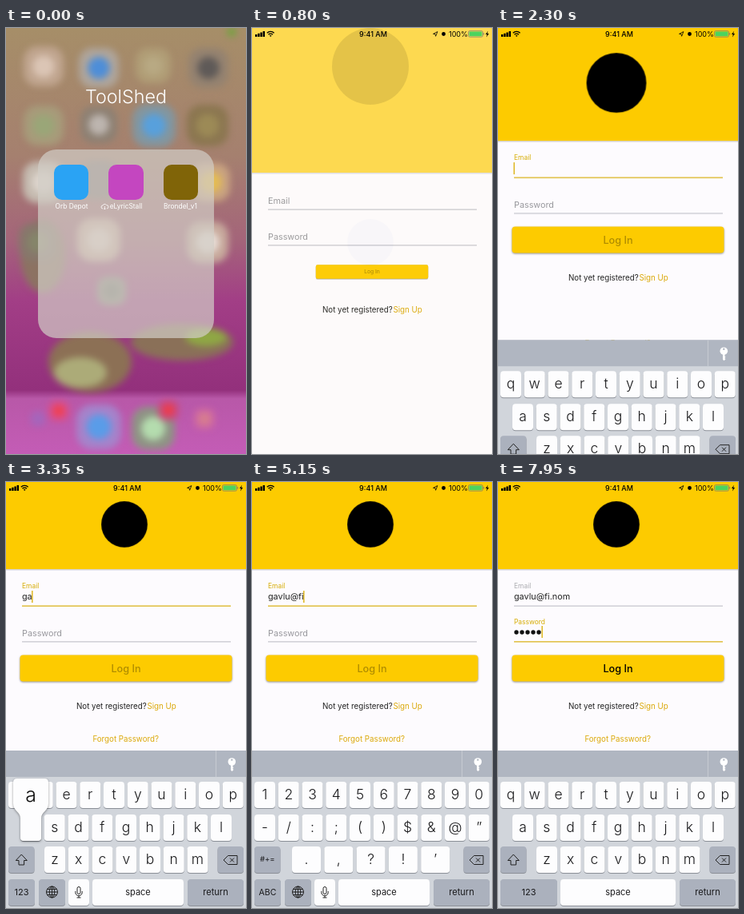
An HTML page that plays this animation: 300x533 px, repeating every 8000 ms.

```html
<!DOCTYPE html>
<html lang="en">
<head>
<meta charset="utf-8">
<title>App launch and log in</title>
<style>
html, body { margin: 0; width: 100%; height: 100%; overflow: hidden; background: #fdfbfe; }
svg { display: block; width: 100vw; height: 100vh; font-family: Inter, "Open Sans", sans-serif; }
.mid { text-anchor: middle; }
.soft { filter: blur(4.2px); }
.move { animation: 8s cubic-bezier(.25, .46, .45, .94) infinite; }

#dim { animation-name: dim; }
#blobs { animation-name: leave; }
#folder { animation-name: zoom; transform-origin: 218px 193px; }
#app { animation-name: open; }
#spinner { animation-name: spin; }
#login { animation-name: login; }
#header { animation-name: header; }
.shift { animation-name: shift; }
#logo { animation-name: logo; transform-origin: 148px 88px; }
#drop { animation-name: drop; }
#button { animation-name: grow; transform-origin: 150px 305px; }
#forgot { animation-name: forgot; }
#keyboard { animation-name: rise; animation-timing-function: cubic-bezier(.215, .61, .355, 1); }
#emailLabel { animation-name: emailLabel; transform-origin: 20px 220px; }
#passLabel { animation-name: passLabel; transform-origin: 20px 265px; }
#emailLine { animation-name: emailLine; }
#passLine { animation-name: passLine; }

@keyframes dim { 0%, .625% { opacity: 0 } 4%, 100% { opacity: .66 } }
@keyframes leave { 0%, .625% { opacity: 1 } 3.8%, 100% { opacity: 0 } }
@keyframes zoom { 0%, .625% { transform: none; opacity: 1 } 3.8%, 100% { transform: scale(2.8); opacity: 0 } }
@keyframes open {
  0%, .625% { transform: translate(197px, 172px) scale(.143, .081); opacity: 0 }
  1.25% { opacity: 1 }
  5.25%, 100% { transform: none; opacity: 1 }
}
@keyframes spin { 0%, 8% { opacity: 1 } 8.5%, 100% { opacity: 0 } }
@keyframes login { 0%, 7.5% { opacity: 0 } 10.625%, 100% { opacity: 1 } }
@keyframes header { 0%, 8.75% { opacity: .6 } 15% { opacity: .88 } 20%, 100% { opacity: 1 } }
@keyframes shift { 0%, 27.5% { transform: none } 31.5%, 100% { transform: translateY(-72px) } }
@keyframes logo { 0%, 27.5% { transform: none } 31.5%, 100% { transform: translateY(-35px) scale(.602) } }
@keyframes drop { 0%, 11.25% { transform: translateY(-40px); opacity: .1 } 20%, 100% { transform: none; opacity: 1 } }
@keyframes grow { 0%, 11.25% { transform: scale(.53) } 20%, 100% { transform: none } }
@keyframes forgot {
  0%, 11.25% { transform: none; opacity: 0 }
  14.5%, 27.5% { transform: none; opacity: 1 }
  31.5%, 100% { transform: translateY(-165px); opacity: 1 }
}
@keyframes rise { 0%, 27.5% { transform: translateY(198px) } 31.25%, 100% { transform: none } }
@keyframes emailLabel {
  0%, 26.25% { transform: none; fill: #98989d }
  28.2%, 78.75% { transform: translateY(-15px) scale(.78); fill: #d6ac00 }
  80%, 100% { transform: translateY(-15px) scale(.78); fill: #aaaaae }
}
@keyframes passLabel {
  0%, 78.75% { transform: none; fill: #98989d }
  80.7%, 100% { transform: translateY(-15px) scale(.78); fill: #d6ac00 }
}
@keyframes emailLine { 0%, 26.25% { stroke: #c6c6cd } 28.2%, 78.75% { stroke: #d9b216 } 80%, 100% { stroke: #c6c6cd } }
@keyframes passLine { 0%, 78.75% { stroke: #c6c6cd } 80.7%, 100% { stroke: #d9b216 } }
</style>
</head>
<body>
<svg viewBox="0 0 300 533" preserveAspectRatio="none">
  <defs>
    <linearGradient id="wall" x2="0" y2="1">
      <stop offset="0" stop-color="#a68e68"/>
      <stop offset=".3" stop-color="#a5806f"/>
      <stop offset=".5" stop-color="#a4647a"/>
      <stop offset=".64" stop-color="#a23e86"/>
      <stop offset=".85" stop-color="#93307c"/>
      <stop offset=".87" stop-color="#b858a8"/>
      <stop offset="1" stop-color="#c45cb6"/>
    </linearGradient>
    <linearGradient id="shade" x2="0" y2="1">
      <stop offset="0" stop-opacity=".2"/>
      <stop offset="1" stop-opacity="0"/>
    </linearGradient>
  </defs>

  <rect width="300" height="533" fill="url(#wall)"/>
  <g id="blobs" class="move"><g id="blur" class="soft"></g></g>
  <rect id="dim" class="move" width="300" height="533"/>
  <g id="folder" class="move" fill="#fff">
    <text class="mid" x="150" y="94" font-size="23.3" font-weight="300">ToolShed</text>
    <rect x="40" y="152" width="220" height="236" rx="23" fill="#d2cdc6" opacity=".7"/>
    <rect x="60" y="171" width="43" height="44" rx="10" fill="#2aa3f4"/>
    <rect x="128" y="171" width="44" height="44" rx="10" fill="#c446c0"/>
    <rect x="197" y="171" width="43" height="44" rx="10" fill="#806408"/>
    <g class="mid" font-size="8.4">
      <text x="82" y="226">Orb Depot</text>
      <text x="150" y="226">eLyricStall</text>
      <text x="218" y="226">Brondel_v1</text>
    </g>
    <path d="M121 226a2 2 0 0 1 0-4a2.6 2.6 0 0 1 4.6-.4a2 2 0 0 1 .4 4.4M123.400 223v4m-1.200-1.200l1.200 1.200l1.200-1.200" fill="none" stroke="#fff" stroke-width=".8"/>
  </g>

  <g id="app" class="move">
    <rect width="300" height="533" rx="2" fill="#ffe99f"/>
    <circle cx="148" cy="268" r="29" fill="#999a9b"/>

    <g id="login" class="move">
      <rect width="300" height="533" fill="#fdfbfe"/>
      <g class="move shift">
        <g id="header" class="move">
          <rect y="181" width="300" height="2.500" fill="url(#shade)"/>
          <rect y="-20" width="300" height="201" fill="#fdcb00"/>
        </g>
        <g font-size="10.8">
          <text id="emailLabel" class="move" x="20" y="220">Email</text>
          <text id="passLabel" class="move" x="20" y="265">Password</text>
          <text id="email" x="20" y="219" fill="#222"></text>
        </g>
        <path id="emailLine" class="move" d="M20 227.200H281" stroke-width="1.200"/>
        <path id="passLine" class="move" d="M20 271.800H281" stroke-width="1.200"/>
        <g id="dots"></g>
        <rect id="caret" width="1.300" height="15" fill="#d9ac00"/>
        <g id="button" class="move">
          <rect x="17.500" y="288.500" width="265" height="33" rx="4" fill="#fdcb00" style="filter:drop-shadow(0 1px 1.200px rgba(0,0,0,.42))"/>
          <text id="submit" class="mid" x="150" y="309.500" font-size="12.700" font-weight="500">Log In</text>
        </g>
        <g font-size="9.750">
          <text x="88" y="356" fill="#222">Not yet registered?</text>
          <text x="176.500" y="356" fill="#dba90a">Sign Up</text>
        </g>
      </g>
      <text id="forgot" class="mid move" x="149.700" y="489.500" font-size="9.750" fill="#dba90a">Forgot Password?</text>
      <g id="drop" class="move"><circle id="logo" class="move" cx="148" cy="88" r="48"/></g>
      <g id="keyboard" class="move">
        <rect y="336" width="300" height="34" fill="#b0b6c1"/>
        <path d="M262.500 336v33" stroke="#c6cad2"/>
        <path d="M281 354v6.500l1.500 1.500l2-2l-1.200-1.200l1.200-1.200l-1-1v-2.600z" fill="#fff"/>
        <circle cx="282.300" cy="350" r="4.800" fill="#fff"/>
        <circle cx="282.300" cy="347.600" r="1.200" fill="#b0b6c1"/>
        <rect y="369" width="300" height="165" fill="#d1d5db"/>
        <g id="keys"></g>
        <g id="popup">
          <path d="M-17-45H17Q22-45 22-40V-14C22-4 13-4 13 5V29Q13 33 9 33H-9Q-13 33-13 29V5C-13-4-22-4-22-14V-40Q-22-45-17-45Z" fill="#fdfdfe" style="filter:drop-shadow(0 1px 1.500px rgba(0,0,0,.4))"/>
          <text id="popChar" class="mid" y="-16" font-size="25" font-weight="300" fill="#111"></text>
        </g>
      </g>
    </g>

    <g id="status">
      <path d="M4 11v-3h2.400v3zM7.200 11v-4.200h2.400v4.200zM10.400 11v-5.600h2.400v5.600zM13.600 11v-7h2.400v7z"/>
      <path d="M18.800 6.300a6.200 6.200 0 0 1 8.800 0M20.500 8.300a3.800 3.800 0 0 1 5.400 0" fill="none" stroke="#000" stroke-width="1.300"/>
      <path d="M21.800 9.600a2 2 0 0 1 2.800 0l-1.400 1.500z"/>
      <circle id="spinner" class="move" cx="36" cy="7.300" r="2.300" fill="none" stroke="#8a7f58" stroke-width="2" stroke-dasharray=".7 1.100"/>
      <text class="mid" x="151.500" y="10.600" font-size="9" font-weight="500">9:41 AM</text>
      <path d="M226.500 7.400l5.400-2.800l-2.300 5.700l-.7-2.700z" fill="none" stroke="#000" stroke-width=".8"/>
      <circle cx="239.500" cy="7.500" r="2.400"/>
      <text x="246" y="10.600" font-size="9">100%</text>
      <rect x="270.500" y="3.600" width="18" height="7.600" rx="1.800" fill="none" stroke="#777" stroke-width=".7"/>
      <rect x="271.500" y="4.600" width="16" height="5.600" rx="1" fill="#4cd35f"/>
      <path d="M289.400 6v2.800q1-.4 1-1.400t-1-1.400z" fill="#777"/>
      <path d="M295 3.700l-3 4.300h1.800l-.8 3.400l3.100-4.500h-1.900z"/>
    </g>
  </g>
</svg>

<script>
const LOOP = 8000;
const $ = id => document.getElementById(id);

function add(parent, tag, attrs, text) {
  const el = document.createElementNS(parent.namespaceURI, tag);
  for (const name in attrs) el.setAttribute(name, attrs[name]);
  if (text) el.textContent = text;
  return parent.appendChild(el);
}

// Blurred home screen: a pale rounded halo around a coloured core.
function blob(x, y, r, halo, core) {
  add($('blur'), 'rect', { x: x - r, y: y - r, width: 2 * r, height: 2 * r, rx: r * .7, fill: halo });
  if (core) add($('blur'), 'circle', { cx: x, cy: y, r: r * .55, fill: core });
}
for (const [cx, cy, rx, ry, fill] of [
  [46, 285, 28, 46, '#8c7262'], [105, 418, 52, 38, '#8c7055'],
  [220, 393, 64, 23, '#8a7058'], [93, 431, 33, 19, '#acab78'], [250, 387, 26, 11, '#8fa744']
]) add($('blur'), 'ellipse', { cx, cy, rx, ry, fill });
blob(47, 48, 25, '#c0a58f', '#dbc5b5');
blob(116, 50, 25, '#afa59b', '#4e8ed8');
blob(184, 47, 22, '#b09d76', '#b8a983');
blob(253, 50, 25, '#948270', '#5f5a58');
blob(47, 122, 25, '#a79b7a', '#9aa678');
blob(116, 121, 23, '#8d8073', '#bdb5af');
blob(185, 122, 27, '#8296a0', '#58a0dc');
blob(252, 122, 26, '#8b7650', '#9c8a56');
blob(47, 193, 26, '#c5bbb0', '#ddd5cd');
blob(116, 190, 24, '#857b78');
blob(256, 193, 24, '#c9a380', '#e5bd52');
blob(40, 268, 24, '#87776b', '#85856a');
blob(116, 265, 27, '#d3b3a6', '#e6d3ca');
blob(252, 268, 26, '#c7a99c', '#e8ddd6');
blob(132, 329, 18, '#8c8a80', '#777a72');
blob(116, 499, 28, '#a583ca', '#5a9ce8');
blob(184, 501, 27, '#8e9384', '#b4dcae');
blob(66, 479, 13, '#d84e8c', '#f0404e');
blob(203, 478, 13, '#c94a80', '#ee3c48');
blob(248, 489, 13, '#cf6aa0', '#d77f8c');
blob(40, 489, 9, '#a565bb');
blob(282, 5, 5, '#6da53a');

// Keyboard
const keyPos = {};
const layer = () => add($('keys'), 'g', {});

function key(parent, x, y, w, label, size, dark) {
  add(parent, 'rect', { x, y: y + 1, width: w, height: 33, rx: 4, fill: '#8b8f97' });
  add(parent, 'rect', { x, y, width: w, height: 33, rx: 4, fill: dark ? '#abb1bd' : '#fdfdfe' });
  if (label) add(parent, 'text', {
    x: x + w / 2, y: y + 16 + size * .34, class: 'mid',
    'font-size': size, 'font-weight': size > 15 ? 300 : 400, fill: '#1a1a1c'
  }, label);
}

function row(parent, chars, first, y, step = 29.75, w = 26) {
  [...chars].forEach((char, i) => {
    const x = first + step * i;
    keyPos[char] = [x, y];
    key(parent, x - w / 2, y, w, char, 17.5);
  });
}

function icon(parent, d) {
  add(parent, 'path', { d, fill: 'none', stroke: '#222', 'stroke-width': 1, 'stroke-linejoin': 'round' });
}

const letters = layer(), symbols = layer(), common = layer(), mailRow = layer(), passRow = layer();
row(letters, 'qwertyuiop', 16, 375);
row(letters, 'asdfghjkl', 31, 416);
row(letters, 'zxcvbnm', 61, 456);
key(letters, 3, 456, 32.5, '', 0, true);
icon(letters, 'M19.300 466l-7 7.500h3.700v5.500h6.600v-5.500h3.700z');
row(symbols, '1234567890', 16, 375);
row(symbols, '-/:;()$&@”', 16, 416);
row(symbols, '.,?!’', 68, 456, 40.3, 36);
key(symbols, 3, 456, 32.5, '#+=', 9.5, true);
key(symbols, 3, 497, 33, 'ABC', 10.5, true);
key(common, 264.5, 456, 32.5, '', 0, true);
icon(common, 'M272 473l5.500-5.500h11.500v11h-11.500zM280 470.500l5 5m0-5l-5 5');
key(common, 227, 497, 70, 'return', 11, true);

const digits = add(mailRow, 'g', {});
key(digits, 3, 497, 33, '123', 11, true);
key(mailRow, 41, 497, 33, '', 0, true);
icon(mailRow, 'M50.500 513a7 7 0 1 0 14 0a7 7 0 1 0-14 0zM54.300 513a3.200 7 0 1 0 6.400 0a3.200 7 0 1 0-6.400 0zM57.500 506v14M50.500 513h14M51.800 509.500h11.400M51.800 516.500h11.400');
key(mailRow, 78, 497, 26, '', 0);
icon(mailRow, 'M89 508.500a2 2 0 0 1 4 0v5a2 2 0 0 1-4 0zM86.800 512v1.500a4.200 4.200 0 0 0 8.400 0v-1.500M91 517.800v2.200M88.500 520h5');
key(mailRow, 108, 497, 114, 'space', 11);
key(passRow, 3, 497, 71, '123', 11, true);
key(passRow, 78, 497, 144, 'space', 11);

// Typing
const FOCUS_EMAIL = 2100, FOCUS_PASS = 6300;
const presses = [
  [2950, 'g'], [3270, 'a'], [3560, 'v'], [3780, 'l'], [4000, 'u'], [4430, '@'],
  [4760, 'f'], [4960, 'i'], [5320, '.'], [5640, 'n'], [5800, 'o'], [5960, 'm']
];
const hidden = Array.from({ length: 5 }, (_, i) => 6950 + 200 * i);
const dots = hidden.map((_, i) => add($('dots'), 'circle', { cx: 23 + 7 * i, cy: 260, r: 2.7, fill: '#111' }));
const show = (el, on) => { el.style.display = on ? '' : 'none'; };

function render(t) {
  const typed = presses.filter(p => p[0] <= t);
  const count = hidden.filter(at => at <= t).length;
  const inPass = t >= FOCUS_PASS;
  const symbolic = (t >= 4200 && t < 4600) || (t >= 5080 && t < 5480);

  $('email').textContent = typed.map(p => p[1]).join('');
  dots.forEach((dot, i) => show(dot, i < count));
  $('submit').setAttribute('fill-opacity', count ? 1 : .31);

  show(letters, !symbolic);
  show(symbols, symbolic);
  show(digits, !symbolic);
  show(mailRow, !inPass);
  show(passRow, inPass);

  const last = typed[typed.length - 1];
  const pressed = last && t - last[0] < 130;
  show($('popup'), pressed);
  if (pressed) {
    $('popup').setAttribute('transform', `translate(${keyPos[last[1]]})`);
    $('popChar').textContent = last[1];
  }

  const touched = inPass ? (count ? hidden[count - 1] : FOCUS_PASS) : (last ? last[0] : FOCUS_EMAIL);
  show($('caret'), t >= FOCUS_EMAIL && (t - touched) % 1000 < 600);
  const width = inPass ? 7 * count : last ? $('email').getComputedTextLength() : 0;
  $('caret').setAttribute('x', 19.5 + width);
  $('caret').setAttribute('y', inPass ? 252 : 208);
}

let start;
function tick(now) {
  start ??= now;
  render((now - start) % LOOP);
  requestAnimationFrame(tick);
}
render(0);
requestAnimationFrame(tick);
</script>
</body>
</html>
```
